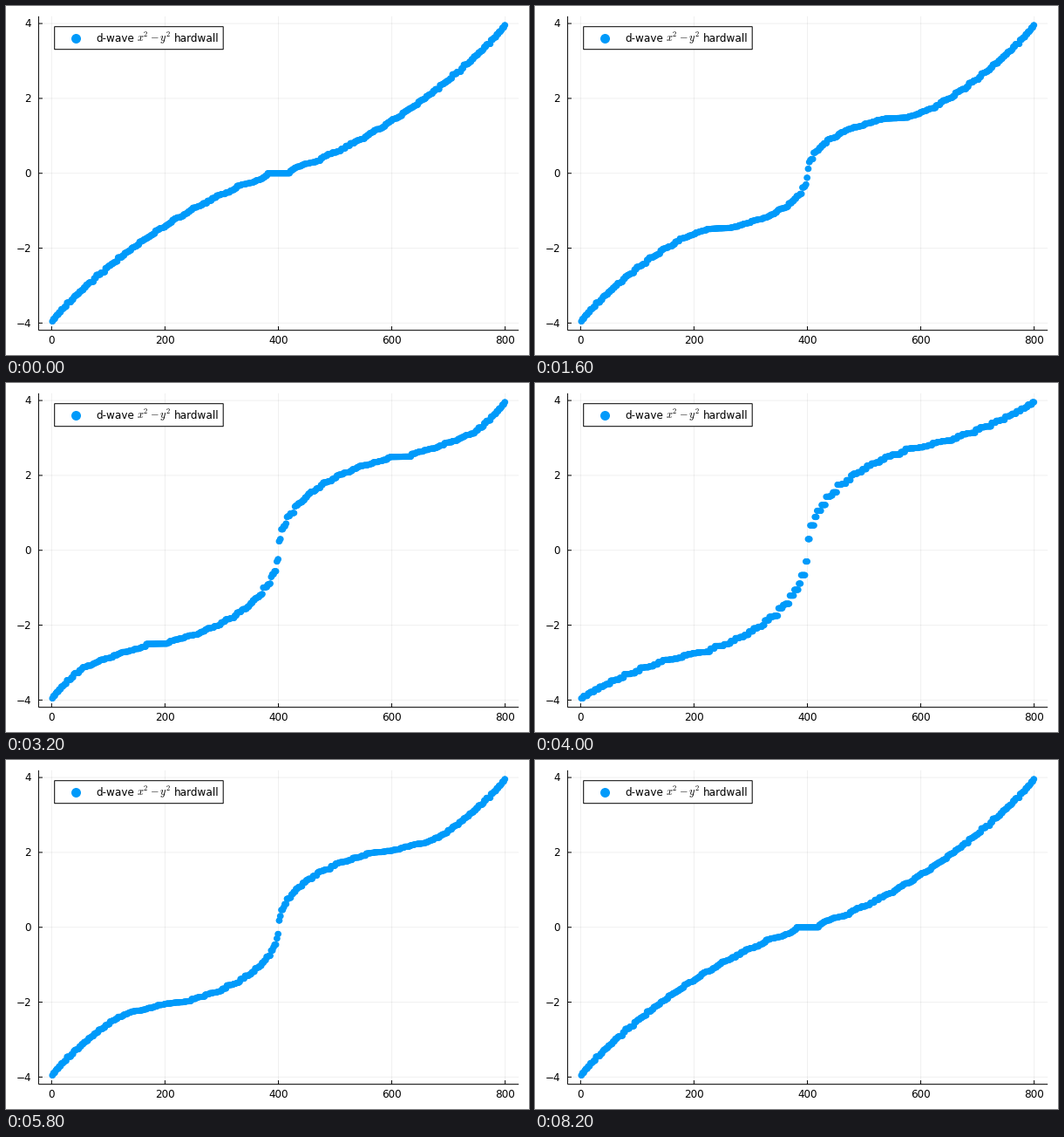
A matplotlib script that plays this animation: 600x400 px, repeating every 8.4 s.

```python
import numpy as np
import matplotlib.pyplot as plt
from matplotlib.animation import FuncAnimation

W, H, DPI = 600, 400, 100
STEPS = 20            # gap steps from 0 to 1
FRAMES = 2 * (STEPS + 1)
SITES = 20            # lattice sites per side
BLUE = "#009afa"
LEFT, RIGHT, TOP, BOTTOM = 37.4, 588.2, 11.8, 371.65
PX = 72 / DPI         # one pixel in points
FONT = 12 * PX
TICK = 4.5

plt.rcParams["font.family"] = "DejaVu Sans"
plt.rcParams["mathtext.fontset"] = "cm"

cosines = np.cos(np.pi * np.arange(1, SITES + 1) / (SITES + 1))
CX, CY = np.meshgrid(cosines, cosines)
COUNT = 2 * SITES**2
INDEX = np.arange(1, COUNT + 1)
E_MAX = 4 * cosines[0]

# Axis limits are the data range widened by 3% on each side.
X_PAD = 0.03 * (COUNT - 1)
X_MIN, X_MAX = 1 - X_PAD, COUNT + X_PAD
Y_LIM = 1.06 * E_MAX


def px(x):
    return LEFT + (x - X_MIN) / (X_MAX - X_MIN) * (RIGHT - LEFT)


def py(y):
    return (TOP + BOTTOM) / 2 - y / (2 * Y_LIM) * (BOTTOM - TOP)


def spectrum(gap):
    """Sorted energies of a d-wave superconductor with open boundaries."""
    energy = 2 * np.hypot(CX + CY, gap * (CX - CY)).ravel()
    return np.sort(np.concatenate([-energy, energy]))


def points(gap):
    return np.column_stack([px(INDEX), py(spectrum(gap))])


fig = plt.figure(figsize=(W / DPI, H / DPI), dpi=DPI, facecolor="white")
ax = fig.add_axes([0, 0, 1, 1])
ax.set_xlim(0, W)
ax.set_ylim(H, 0)
ax.axis("off")


def line(xs, ys, z=3, **style):
    ax.plot(xs, ys, color="black", lw=PX, zorder=z, snap=False,
            solid_capstyle="butt", **style)


def grid(xs, ys):
    line(xs, ys, z=1, alpha=0.058)


def label(x, y, text, ha="left", size=FONT):
    ax.text(x, y, text, ha=ha, va="baseline", fontsize=size, zorder=6)


for v in range(0, 801, 200):
    x = px(v)
    grid([x, x], [TOP, BOTTOM])
    line([x, x], [BOTTOM, BOTTOM - TICK])
    label(x, 387.4, str(v), ha="center")

for v in range(-4, 5, 2):
    y = py(v)
    grid([LEFT, RIGHT], [y, y])
    line([LEFT, LEFT + TICK], [y, y])
    label(29, y + 4.2, str(v).replace("-", "\u2212"), ha="right")

line([LEFT, RIGHT], [BOTTOM, BOTTOM])
line([LEFT, LEFT], [TOP, BOTTOM])


def dots(xy, diameter, z):
    # One size per dot keeps sub-pixel positions.
    area = np.full(len(xy), (diameter * PX) ** 2)
    return ax.scatter(xy[:, 0], xy[:, 1], s=area, color=BLUE,
                      linewidths=0, zorder=z)


curve = dots(points(0), 7.1, 4)

ax.add_patch(plt.Rectangle((55.7, 23.7), 193.5, 26, fc="white", ec="black",
                           lw=PX, zorder=5, snap=False))
dots(np.array([[80.1, 36.6]]), 11, 6)
label(103.3, 40.6, "d-wave")
label(150, 40.6, "$x^2-y^2$", size=FONT * 1.03)
label(244.3, 40.6, "hardwall", ha="right")


def update(frame):
    step = min(frame, FRAMES - 1 - frame)
    curve.set_offsets(points(step / STEPS))
    return (curve,)


anim = FuncAnimation(fig, update, frames=FRAMES, interval=200,
                     repeat=True, repeat_delay=0)
plt.show()
```
